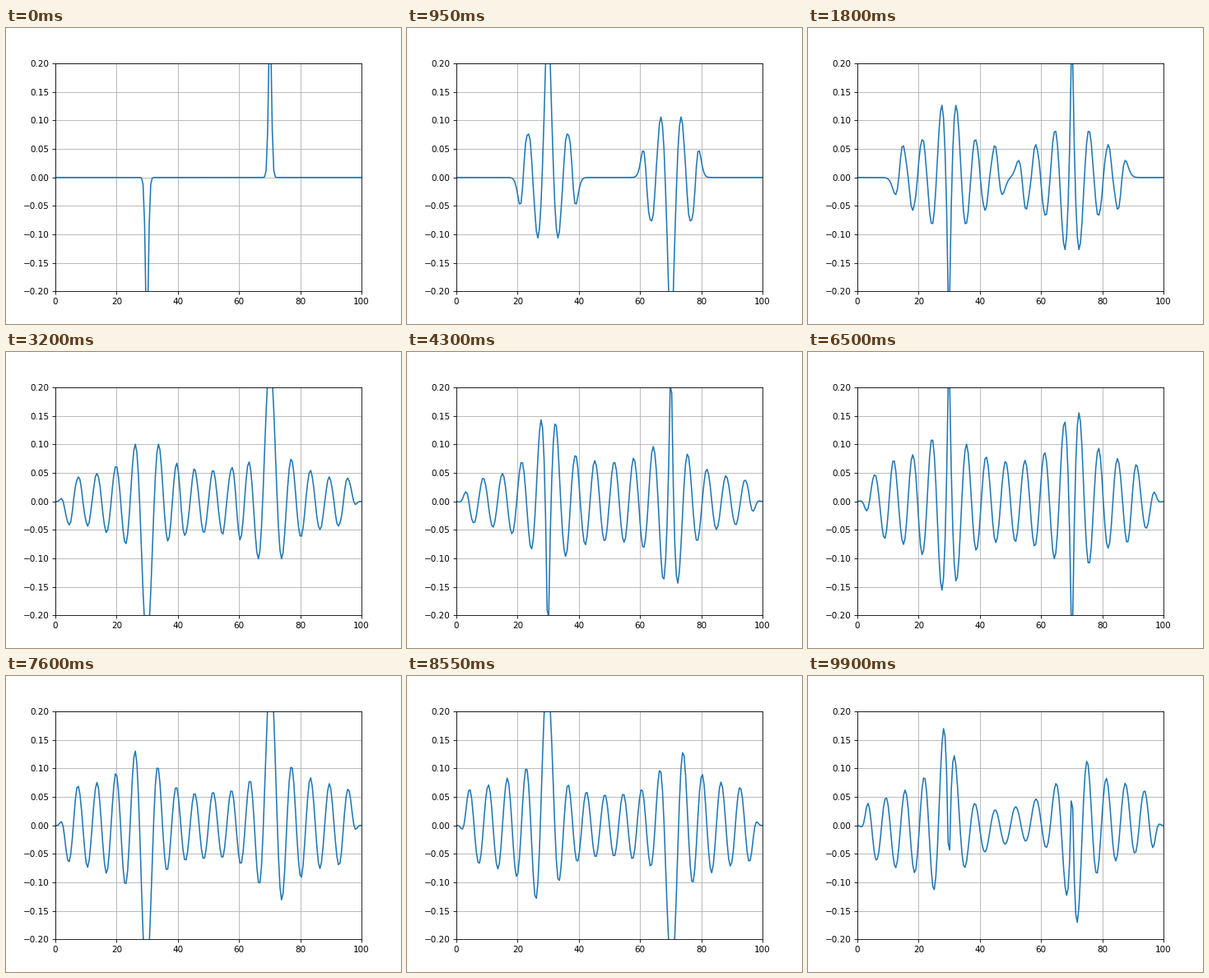
These frames come from a looping animation (480x360 px, 9.95 s). A matplotlib script:

```python
import numpy as np
import matplotlib.pyplot as plt
from matplotlib.animation import FuncAnimation

SIZE, CELLS = 100, 200
FRAMES, INTERVAL = 199, 50
DT, SUBSTEPS = 0.05, 10      # half a time unit passes per frame
START_STEPS = 20             # the first frame shows t = 1
LAYER, SIGMA_MAX = 5, 10     # absorbing border

x = np.linspace(0, SIZE, CELLS)
dx = x[1] - x[0]


def block(cx, cy):
    """Square emitter, one unit wide."""
    return np.outer(abs(x - cy) < 0.5, abs(x - cx) < 0.5).astype(float)


def damping():
    depth = np.clip(LAYER - np.minimum(x, SIZE - x), 0, None)
    sigma = SIGMA_MAX * (depth / LAYER) ** 2
    return sigma[:, None] + sigma[None, :]


def simulate():
    """Damped 2D wave equation driven by two opposite oscillators.

    Returns the profile along the middle row for each frame.
    """
    source = (block(70, 50) - block(30, 50))[1:-1, 1:-1]
    loss = damping()[1:-1, 1:-1] * DT / 2
    keep, scale = 1 - loss, 1 / (1 + loss)
    ratio = (DT / dx) ** 2

    prev = np.zeros((CELLS, CELLS))
    u = np.zeros_like(prev)
    rows = []
    for n in range(START_STEPS + SUBSTEPS * (FRAMES - 1)):
        drive = DT**2 * np.cos(n * DT) * (0.5 if n == 0 else 1)
        inner = u[1:-1, 1:-1]
        around = u[2:, 1:-1] + u[:-2, 1:-1] + u[1:-1, 2:] + u[1:-1, :-2]
        step = (2 - 4 * ratio) * inner + ratio * around + drive * source
        prev[1:-1, 1:-1] = (step - keep * prev[1:-1, 1:-1]) * scale
        prev, u = u, prev
        done = n + 1 - START_STEPS
        if done >= 0 and done % SUBSTEPS == 0:
            rows.append(u[CELLS // 2].copy())
    return rows


profiles = simulate()

fig, ax = plt.subplots(figsize=(6.4, 4.8), dpi=75)
ax.set_xlim(0, SIZE)
ax.set_ylim(-0.2, 0.2)
ax.grid(True)
line, = ax.plot(x, profiles[0])


def update(i):
    line.set_ydata(profiles[i])
    return line,


anim = FuncAnimation(fig, update, frames=FRAMES, interval=INTERVAL,
                     repeat=True, repeat_delay=0)
plt.show()
```
